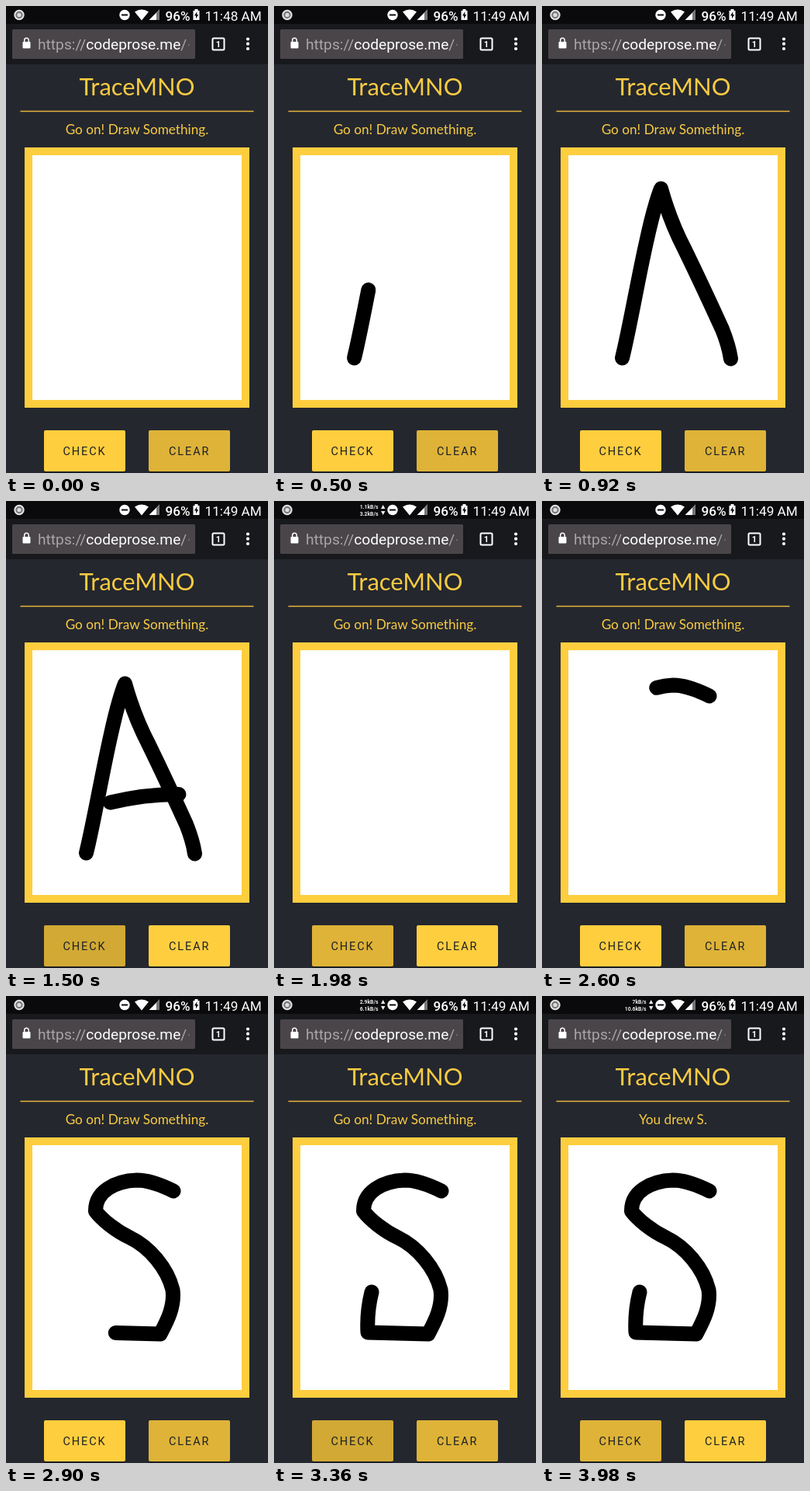
Write an HTML page that moves like this. It is 338x601 px and loops after 4220 ms.

```html
<!DOCTYPE html>
<html lang="en">
<head>
<meta charset="utf-8">
<title>Letter drawing demo</title>
<style>
  html, body { margin: 0; height: 100%; overflow: hidden; background: #24272e; }
  svg { display: block; width: 338px; height: 601px; font-family: Roboto, sans-serif; }
  .gold { fill: #f8cb43; font-family: Lato, sans-serif; text-anchor: middle; }
  .status { font-size: 17.2px; fill: #fff; }
  .speed { font-size: 6.8px; font-weight: 700; fill: #eee; text-anchor: end; }
  .button { fill: #ffce3f; }
  .label { font-size: 14.5px; letter-spacing: 1.9px; fill: #1d2026; }
  .ink { fill: none; stroke: #000; stroke-width: 19; stroke-linecap: round; stroke-linejoin: round; stroke-dasharray: 1 2; }
</style>
</head>
<body>
<svg viewBox="0 0 338 601">
  <rect width="338" height="601" fill="#24272e"/>
  <rect width="338" height="75" fill="#18191d"/>
  <rect width="338" height="23" fill="#0a0a0c"/>

  <!-- Status bar -->
  <circle cx="17" cy="11.5" r="5.7" fill="#777" stroke="#e4e4e4" stroke-width="2"/>
  <circle cx="17" cy="11.5" r="2.6" fill="#ddd"/>
  <g id="network">
    <text class="speed" id="up" x="134.5" y="10"/>
    <text class="speed" id="down" x="134.5" y="18.5"/>
    <path d="M138 10l2.7-5 2.7 5zM138 13h5.4l-2.7 5z" fill="#eee"/>
  </g>
  <circle cx="153" cy="11.5" r="6.7" fill="#fff"/>
  <path d="M149 11.5h8" stroke="#0a0a0c" stroke-width="2"/>
  <path d="M166 7.5Q175 1.5 184 7.5L175 18.500zM198 4.500V18H184.500z" fill="#fff"/>
  <path d="M194 8.500L198 4.500V18H194z" fill="#777"/>
  <text class="status" x="205.5" y="18.5" font-weight="500">96%</text>
  <path d="M241.5 6h2v-2h4v2h2v12h-8z" fill="#fff"/>
  <path d="M246.5 7l-3.5 5.5h2v4l3.2-5.5h-2z" fill="#0a0a0c"/>
  <text class="status" id="clock" x="256.5" y="18.5"/>

  <!-- Address bar -->
  <rect x="8" y="30" width="236" height="38" rx="1.5" fill="#494549"/>
  <rect x="21.5" y="46" width="10" height="8.5" rx="1" fill="#fff"/>
  <path d="M23.7 46v-2a2.8 2.8 0 0 1 5.6 0v2" fill="none" stroke="#fff" stroke-width="1.5"/>
  <text x="41" y="56" font-size="19.2" fill="#fff"><tspan fill="#a9a6a9">https://</tspan>codeprose.me<tspan fill="#a9a6a9">/</tspan></text>
  <path d="M235 50h2" stroke="#777377" stroke-width="1.5"/>
  <rect x="266.5" y="41.5" width="15" height="15" rx="1.5" fill="none" stroke="#fff" stroke-width="2"/>
  <text x="274" y="53" font-size="11" font-weight="700" fill="#fff" text-anchor="middle">1</text>
  <g fill="#fff">
    <circle cx="312" cy="42.5" r="2.1"/><circle cx="312" cy="48.7" r="2.1"/><circle cx="312" cy="55" r="2.1"/>
  </g>

  <!-- Page -->
  <text class="gold" x="169" y="115" font-size="31">TraceMNO</text>
  <path d="M18.5 135.5h301" stroke="#e5b53b" stroke-width="1.3"/>
  <text class="gold" id="message" x="169" y="164.5" font-size="17.2"/>
  <rect x="29" y="187" width="280" height="325" fill="#fefffe" stroke="#ffce3f" stroke-width="10"/>
  <path class="ink" id="legs" pathLength="1" d="M103.5 453C113 415 124 350 135 302C142 270 148 249 153.5 235C161 262 172 290 184 313C205 356 222 393 232.5 416Q241 437 243.5 454"/>
  <path class="ink" id="bar" pathLength="1" d="M134.5 388C160 382 190 377 223 377.5"/>
  <path class="ink" id="curve" pathLength="1" d="M216 251C200 243 185 237 169 237C140 238 115 252 115.500 277C124 288 141 302 160 311C185 323 208 350 215 378C218 400 207 420 199 435L121 433C120 415 122 397 126 381"/>

  <rect x="49" y="548" width="105" height="53" rx="2" fill="#1b1d22"/>
  <rect x="184" y="548" width="105" height="53" rx="2" fill="#1b1d22"/>
  <rect class="button" x="49" y="546" width="105" height="53" rx="2"/>
  <rect class="button" x="184" y="546" width="105" height="53" rx="2"/>
  <rect id="checkShade" x="49" y="546" width="105" height="53" rx="2"/>
  <rect id="clearShade" x="184" y="546" width="105" height="53" rx="2"/>
  <text class="label" x="73.5" y="577.5">CHECK</text>
  <text class="label" x="210" y="577.5">CLEAR</text>
</svg>
<script>
const LOOP = 4220, FOCUS = 0.13, PRESSED = 0.18;
const $ = id => document.getElementById(id);

// Linear interpolation through [time, value] pairs
function track(t, keys) {
  const i = keys.findIndex(k => k[0] > t);
  if (i === 0) return keys[0][1];
  if (i < 0) return keys[keys.length - 1][1];
  const [t0, v0] = keys[i - 1], [t1, v1] = keys[i];
  return v0 + (v1 - v0) * (t - t0) / (t1 - t0);
}

// Latest value whose start time has passed
const step = (t, keys) => keys.filter(k => k[0] <= t).pop()[1];

const strokes = {
  legs: { keys: [[400, 0], [920, 1]], until: 1980 },
  bar: { keys: [[990, 0], [1140, 1]], until: 1980 },
  curve: { keys: [[2480, 0], [2600, 0.152], [2970, 1]], until: LOOP }
};
const shades = {
  checkShade: [[1340, 0], [1440, PRESSED], [1560, PRESSED], [1740, FOCUS], [1990, FOCUS], [2140, 0],
               [3220, 0], [3330, PRESSED], [3500, PRESSED], [3700, FOCUS]],
  clearShade: [[1380, FOCUS], [1480, 0], [1990, 0], [2080, PRESSED], [2160, PRESSED], [2240, FOCUS],
               [3370, FOCUS], [3470, 0]]
};
const prompt = "Go on! Draw Something.";
const messages = [[0, prompt], [1640, "You drew A."], [1980, prompt], [3640, "You drew S."]];
const speeds = [[0, null], [1600, ["1.1", "3.2"]], [2420, null], [3200, ["2.9", "6.1"]], [3980, ["7", "10.6"]]];

function draw(t) {
  for (const id in strokes) {
    const { keys, until } = strokes[id], done = track(t, keys);
    $(id).style.strokeDashoffset = 1 - done;
    $(id).style.visibility = done > 0 && t < until ? "visible" : "hidden";
  }
  for (const id in shades) $(id).style.opacity = track(t, shades[id]);
  $("message").textContent = step(t, messages);
  $("clock").textContent = t < 240 ? "11:48 AM" : "11:49 AM";
  const speed = step(t, speeds);
  $("network").style.visibility = speed ? "visible" : "hidden";
  if (speed) ["up", "down"].forEach((id, i) => $(id).textContent = speed[i] + "kB/s");
}

const start = performance.now();
function frame() {
  draw((performance.now() - start) % LOOP);
  requestAnimationFrame(frame);
}
frame();
</script>
</body>
</html>
```
